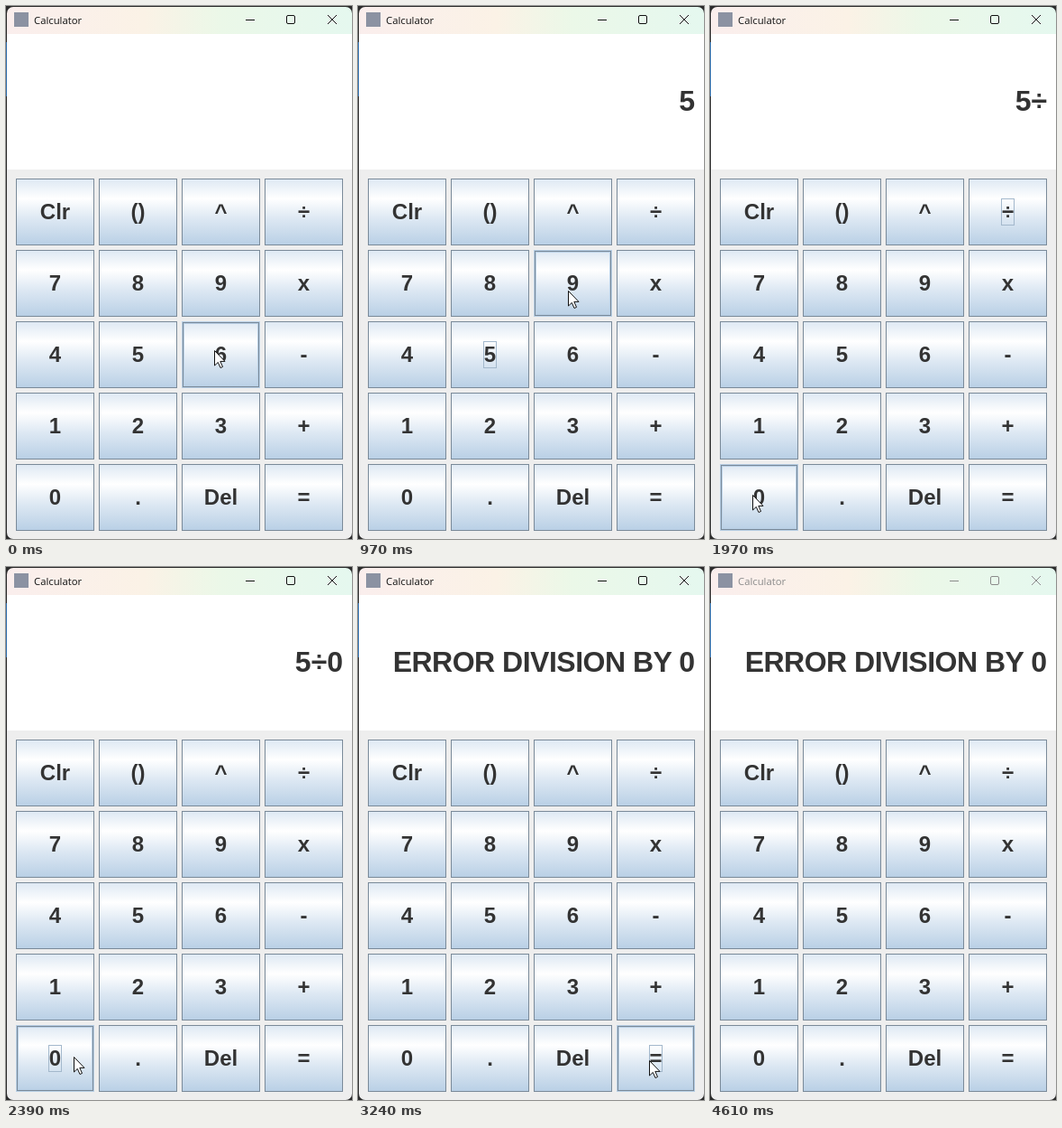
Write an HTML page that moves like this. It is 384x590 px and loops after 4640 ms.

```html
<!DOCTYPE html>
<html lang="en">
<head>
<meta charset="utf-8">
<title>Calculator</title>
<style>
html, body { margin: 0; width: 384px; height: 590px; overflow: hidden; background: #2b2b2b; }
svg { display: block; }
.key, .display { font-family: "Liberation Sans", Arial, sans-serif; font-weight: bold; fill: #333; }
.key { font-size: 24px; text-anchor: middle; }
.display { font-size: 32px; text-anchor: end; }
.title { font: 11.3px "Open Sans", "Noto Sans", sans-serif; }
</style>
</head>
<body>
<svg id="stage" width="384" height="590" viewBox="0 0 384 590">
  <defs>
    <linearGradient id="bar">
      <stop offset="0" stop-color="#faeeed"/>
      <stop offset=".4" stop-color="#fbf2e6"/>
      <stop offset=".62" stop-color="#ebf8e8"/>
      <stop offset="1" stop-color="#e5f8ef"/>
    </linearGradient>
    <linearGradient id="face" x2="0" y2="1">
      <stop offset="0" stop-color="#dde8f3"/>
      <stop offset=".3" stop-color="#fff"/>
      <stop offset=".6" stop-color="#dde8f3"/>
      <stop offset="1" stop-color="#b8cfe5"/>
    </linearGradient>
    <clipPath id="frame"><rect x="1" y="1" width="383" height="589" rx="7"/></clipPath>
  </defs>
  <rect y="40" width="1" height="60" fill="#2f6fae"/>
  <g clip-path="url(#frame)">
    <rect width="384" height="31" fill="url(#bar)"/>
    <rect y="31" width="384" height="150" fill="#fff"/>
    <rect y="181" width="384" height="409" fill="#eee"/>
  </g>
  <rect x="9" y="7" width="16" height="16" fill="#8b92a2"/>
  <g id="caption">
    <text class="title" x="31" y="20" fill="currentColor">Calculator</text>
    <g fill="none" stroke="currentColor">
      <path d="M266 15.5h10"/>
      <rect x="311.5" y="10.5" width="9" height="9" rx="1.5"/>
      <path d="M357 10l10 10m0 -10l-10 10"/>
    </g>
  </g>
  <text id="display" class="display" y="116"></text>
  <g id="keys"></g>
  <path id="cursor" d="M.5 .5V17L4.3 13.4L7 19.5L9.5 18.4L6.8 12.4H12Z" fill="#fff" stroke="#111"/>
</svg>
<script>
const LOOP = 4640;
const LABELS = ["Clr", "()", "^", "÷", "7", "8", "9", "x", "4", "5", "6", "-",
                "1", "2", "3", "+", "0", ".", "Del", "="];
const KEY_W = 87, KEY_H = 74;
const SHADOW = "#b8cfe5", DARK = "#7a8a99", FOCUS = "#a3b8cc";

// time, x, y, easing towards this point
const PATH = [
  [0, 231, 381], [480, 162, 379, "both"], [850, 162, 379], [1110, 321, 236, "both"],
  [1300, 321, 236], [1390, 315, 245, "in"], [1640, 60, 525, "both"], [1850, 47, 541, "out"],
  [2300, 47, 541], [2390, 75, 542, "in"], [2730, 323, 547, "both"], [2850, 323, 546],
  [3610, 323, 546], [3700, 390, 535, "in"]
];
// pressed at, released at, key, display after release
const CLICKS = [
  [700, 790, "5", "5"],
  [1170, 1260, "÷", "5÷"],
  [2040, 2130, "0", "5÷0"],
  [3090, 3180, "=", "ERROR DIVISION BY 0"]
];
const BLUR_AT = 4575;

const EASE = {
  in: u => u * u,
  out: u => 1 - (1 - u) ** 2,
  both: u => u * u * (3 - 2 * u)
};

const $ = id => document.getElementById(id);

function add(parent, tag, attrs) {
  const el = document.createElementNS("http://www.w3.org/2000/svg", tag);
  for (const name in attrs) el.setAttribute(name, attrs[name]);
  return parent.appendChild(el);
}

function outline(parent, x, y, width, height, stroke) {
  return add(parent, "rect", { x: x + .5, y: y + .5, width: width - 1, height: height - 1, fill: "none", stroke });
}

function makeKey(label, i) {
  const x = 11 + i % 4 * 92, y = 191 + Math.floor(i / 4) * 79;
  const g = add($("keys"), "g", { transform: `translate(${x} ${y})` });
  const face = add(g, "rect", { width: KEY_W, height: KEY_H });
  const edges = [0, 1, 2].map(n => outline(g, n, n, KEY_W - 2 * n, KEY_H - 2 * n, SHADOW));
  const focus = outline(g, 36, 22, 15, 30, FOCUS);
  add(g, "text", { class: "key", x: 43.5, y: 45 }).textContent = label;
  return { label, x, y, face, edges, focus };
}

const keys = LABELS.map(makeKey);

function pointer(t) {
  const i = PATH.findIndex(p => p[0] > t);
  if (i < 0) return PATH[PATH.length - 1].slice(1, 3);
  const [t0, x0, y0] = PATH[i - 1], [t1, x1, y1, ease] = PATH[i];
  const u = (t - t0) / (t1 - t0), k = ease ? EASE[ease](u) : u;
  return [Math.round(x0 + (x1 - x0) * k), Math.round(y0 + (y1 - y0) * k)];
}

function paintKey(key, hover, pressed, focused) {
  const colors = pressed ? [DARK, DARK, "none"] : hover ? [SHADOW, DARK, SHADOW] : [DARK, "none", "none"];
  key.face.setAttribute("fill", pressed ? SHADOW : "url(#face)");
  key.edges.forEach((edge, n) => edge.setAttribute("stroke", colors[n]));
  key.focus.setAttribute("stroke", focused ? FOCUS : "none");
}

function render(t) {
  const [x, y] = pointer(t);
  const active = t < BLUR_AT;
  let focus = "", down = "", shown = "";
  for (const [press, release, label, result] of CLICKS) {
    if (t >= press) focus = label;
    if (t >= press && t < release) down = label;
    if (t >= release) shown = result;
  }
  for (const key of keys) {
    const hover = x >= key.x && x < key.x + KEY_W && y >= key.y && y < key.y + KEY_H;
    paintKey(key, hover, key.label === down, active && key.label === focus);
  }
  // the long message is set slightly tighter
  const spacing = shown.length > 3 ? -.5 : 0;
  $("display").textContent = shown;
  $("display").style.letterSpacing = spacing + "px";
  $("display").setAttribute("x", 374 + spacing);
  $("caption").style.color = active ? "#111" : "#8b8b8b";
  $("cursor").setAttribute("transform", `translate(${x} ${y})`);
}

const start = performance.now();
function tick() {
  render((performance.now() - start) % LOOP);
  requestAnimationFrame(tick);
}
tick();
</script>
</body>
</html>
```
